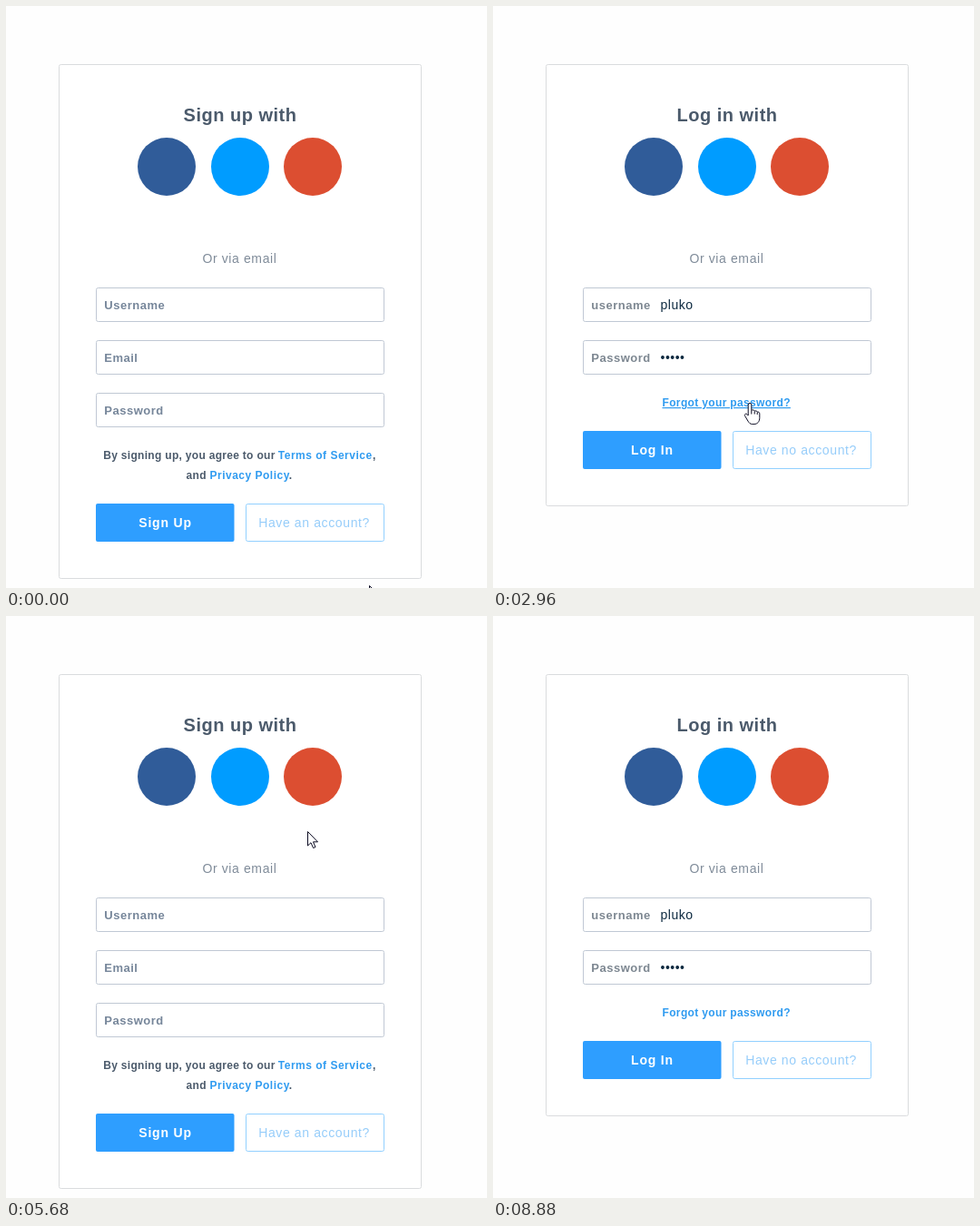
Recreate the animation shown at these times as an HTML page. Size 530 px wide and 641 px high, loop 9120 ms.

```html
<!DOCTYPE html>
<html lang="en">
<head>
<meta charset="utf-8">
<title>Account forms</title>
<style>
  html, body { margin: 0; width: 100%; height: 100%; overflow: hidden; background: #fefefe; }
  svg { display: block; cursor: default; font: 14px "Liberation Sans", Arial, sans-serif; letter-spacing: .62px; }
  text { white-space: pre; }
  .page { display: none; }
  .page.on { display: inline; }
  .mid { text-anchor: middle; }
  .card { fill: #fff; stroke: #dadcde; }
  .title { font-weight: bold; font-size: 20px; letter-spacing: .5px; fill: #4b5a6b; }
  .note { fill: #7f8b99; }
  .field rect { fill: #fff; stroke: #c0c8d4; }
  .label { font-weight: bold; font-size: 13px; letter-spacing: .5px; fill: #76869a; }
  .login .label { fill: #7d8791; }
  .value { letter-spacing: .5px; fill: #0d2a40; }
  .hint { fill: #9c9da4; }
  .main rect { fill: #2e9eff; }
  .main text { font-weight: bold; letter-spacing: .8px; fill: #fff; }
  .alt rect { fill: #fff; stroke: #92d0ff; }
  .alt text { fill: #96cdfa; }
  .alt.hot rect { stroke: #2e9eff; }
  .alt.hot text { fill: #379ffb; }
  .small { font-weight: bold; font-size: 12px; letter-spacing: .3px; fill: #4b5a6b; }
  .link { font-weight: bold; font-size: 12px; letter-spacing: .5px; fill: #2f9bf0; }
  .link.hot { text-decoration: underline; }
  #pointer { pointer-events: none; }
  #pointer path { fill: #fff; stroke: #0b0b22; stroke-linejoin: round; display: none; }
  #pointer path.on { display: inline; }
</style>
</head>
<body>
<svg id="stage" width="530" height="641" viewBox="0 0 530 641">
  <g id="pages"></g>
  <g id="pointer">
    <path id="arrow" d="M.5.5V16L4 12.7 6.6 18.5 9 17.5 6.5 11.8H11.5Z"/>
    <path id="hand" d="M-1.8 14V2.2a1.8 1.8 0 0 1 3.6 0V8.5c1-1 3-.8 3.4.7 1-.7 2.8-.3 3 1 1.5-.5 2.6.4 2.6 2V16.5c0 4-2.2 7-6 7H2.5C.5 23.5-1 22-2 20.2L-5.4 14.5c-1-1.8 1.2-3.2 2.4-1.8ZM1.8 8.5v4M5.2 9.5v3M8.2 10.5v2.5"/>
    <path id="beam" d="M-3-7.5H3M0-7.5V7.5M-3 7.5H3"/>
  </g>
</svg>
<script>
const LOOP = 9120, STEP = 80;

const box = (x, y, w, h, r = 2) =>
  `<rect x="${x + .5}" y="${y + .5}" width="${w - 1}" height="${h - 1}" rx="${r}"/>`;
const text = (kind, x, y, str) => `<text class="${kind}" x="${x}" y="${y}">${str}</text>`;
const card = h => `<g class="card">${box(58, 64, 400, h)}</g>`;
const title = str => text('title mid', 258, 127, str);
const field = (y, inner) => `<g class="field">${box(99, y, 318, 38)}${inner}</g>`;
const labelled = (y, label, value = '') =>
  field(y, text('label', 108.3, y + 24, label) + text('value', 184.5, y + 24, value));
const buttons = (y, main, alt) =>
  `<g class="main"><rect x="99" y="${y}" width="152.5" height="42" rx="2"/>${text('mid', 175.5, y + 26, main)}</g>
   <g class="alt">${box(264, y, 153, 42)}${text('', 278.2, y + 26, alt)}</g>`;
const social = [[177, '#305c99'], [258, '#009cff'], [338, '#dc4e31']]
  .map(([x, fill]) => `<circle cx="${x}" cy="177" r="32" fill="${fill}"/>`).join('')
  + text('note', 216.4, 283, 'Or via email');

const pages = {
  signup: card(567) + title('Sign up with') + social
    + labelled(310, 'Username') + labelled(368, 'Email') + labelled(426, 'Password')
    + text('small', 107.3, 499, 'By signing up, you agree to our')
    + text('link', 299.8, 499, 'Terms of Service') + text('small', 404, 499, ',')
    + text('small', 198.6, 521, 'and') + text('link', 224.5, 521, 'Privacy Policy')
    + text('small', 311.8, 521, '.')
    + buttons(548, 'Sign Up', 'Have an account?'),
  login: card(487) + title('Log in with') + social
    + labelled(310, 'username', 'pluko') + labelled(368, 'Password', '•••••')
    + `<g style="letter-spacing:.35px">${text('link" style="letter-spacing:inherit', 186.5, 441, 'Forgot your password?')}</g>`
    + buttons(468, 'Log In', 'Have no account?'),
  // This page is short enough to lose the scrollbar, which shifts it right.
  reset: `<g transform="translate(8)">${card(252)}${title('Reset Password')}
    ${field(155, text('hint', 184, 179, 'Username / Email'))}
    ${buttons(213, 'Reset', 'Have no account?')}</g>`
};

const schedule = [[0, 'signup'], [1600, 'login'], [3600, 'reset'], [5680, 'signup'], [7840, 'login']];

// Pointer tip: time, x, y
const path = [
  [0, 400, 638], [480, 400, 638], [1120, 360, 571],
  [2160, 360, 571], [2480, 318, 507], [2800, 283, 438], [2880, 283, 438], [2960, 283, 437],
  [4320, 283, 437], [4640, 316, 310], [4960, 332, 237],
  [6000, 332, 237], [6800, 339, 499], [6960, 343, 538], [7200, 343, 561],
  [8400, 343, 561], [8800, 464, 628], [8880, 490, 660], [LOOP, 490, 660]
];

const $ = id => document.getElementById(id);
$('pages').innerHTML = Object.entries(pages)
  .map(([name, body]) => `<g class="page ${name}" id="${name}">${body}</g>`).join('');

function tipAt(t) {
  const i = path.findIndex(p => p[0] > t);
  const [t0, x0, y0] = path[i - 1], [t1, x1, y1] = path[i];
  const k = (t - t0) / (t1 - t0);
  return [Math.round(x0 + (x1 - x0) * k), Math.round(y0 + (y1 - y0) * k)];
}

function draw(time) {
  const t = Math.floor(time % LOOP / STEP) * STEP;
  const current = schedule.filter(s => s[0] <= t).pop()[1];
  for (const name in pages) $(name).classList.toggle('on', name === current);

  const [x, y] = tipAt(t);
  const under = document.elementFromPoint(x, y);
  const target = under && under.closest('.alt, .link');
  document.querySelectorAll('.alt, .link').forEach(el => el.classList.toggle('hot', el === target));

  const shape = target ? 'hand' : under && under.closest('.field') ? 'beam' : 'arrow';
  for (const name of ['arrow', 'hand', 'beam']) $(name).classList.toggle('on', name === shape);
  $('pointer').setAttribute('transform', `translate(${x} ${y})`);
}

const start = performance.now();
function tick() {
  draw(performance.now() - start);
  requestAnimationFrame(tick);
}
tick();
</script>
</body>
</html>
```
